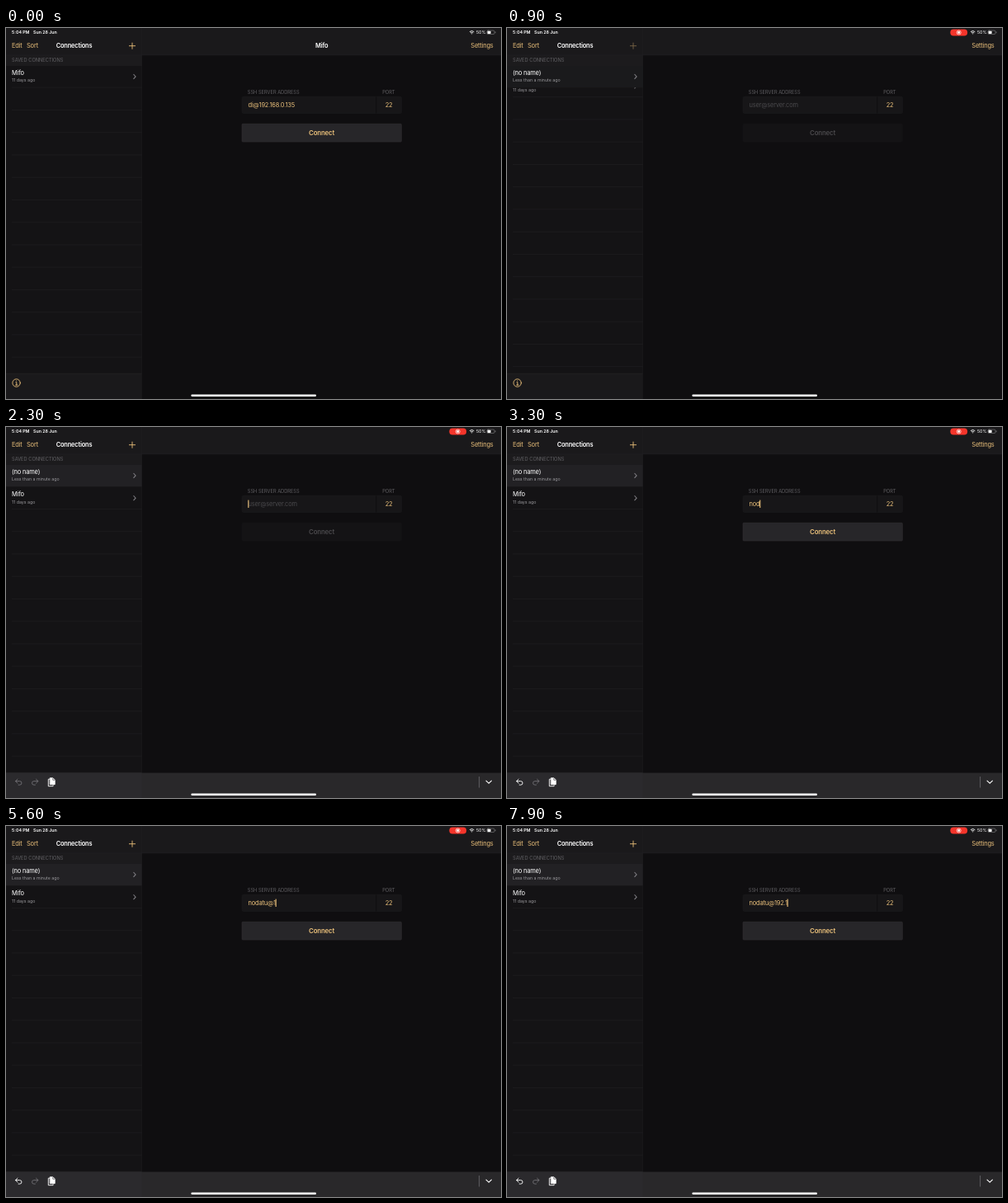
These frames come from a looping animation (600 by 450 pixels, 8 s). An HTML page:

```html
<!DOCTYPE html>
<html lang="en">
<head>
<meta charset="utf-8">
<title>Connections</title>
<style>
  html, body { margin: 0; width: 100%; height: 100%; overflow: hidden; background: #0f0e10; }
  svg { display: block; width: 600px; height: 450px; }
  text { font: 7.47px Inter, sans-serif; letter-spacing: -.025em; fill: #fff; white-space: pre; }
  .small { font-size: 5.27px; letter-spacing: 0; }
  .sub { fill: #98979b; }
  .label { font-size: 5.7px; letter-spacing: 0; fill: #626165; }
  .bold { font-weight: 600; }
  .gold { fill: #e9bf7a; }
  .mid { text-anchor: middle; }
  .hint { fill: #4a494c; }
  .line { fill: none; stroke: #fff; stroke-linecap: round; stroke-linejoin: round; }
  .chevron { fill: none; stroke: #7d7c80; stroke-width: 1.1; }
  #button { font-size: 7.9px; }
</style>
</head>
<body>
<svg viewBox="0 0 600 450">
  <rect width="600" height="450" fill="#0f0e10"/>
  <rect width="164.5" height="450" fill="#141315"/>

  <g id="list">
    <path id="rules" stroke="#201f22" stroke-width=".7"/>
    <text x="7" y="57">Mifo</text>
    <text x="7" y="65.3" class="small sub">11 days ago</text>
    <path d="M154.5 56l2.6 2.9-2.6 2.9" class="chevron"/>
  </g>
  <g id="newRow">
    <rect y="46" width="164.5" height="26.3" fill="#151416"/>
    <rect id="selected" y="46" width="164.5" height="26.3" fill="#222124"/>
    <text x="7" y="57">(no name)</text>
    <text x="7" y="65.3" class="small sub">Less than a minute ago</text>
    <path d="M154.5 56l2.6 2.9-2.6 2.9" class="chevron"/>
  </g>

  <rect width="600" height="33" fill="#1a191b"/>
  <rect y="33" width="164.5" height="13" fill="#1c1b1d"/>
  <path d="M0 32.8H600M164.6 0V450" stroke="#232225" stroke-width=".5"/>
  <text x="7" y="7.3" class="small bold">5:04 PM</text>
  <text x="33" y="7.3" class="small bold">Sun 28 Jun</text>
  <text x="570" y="7.3" class="small">50%</text>
  <g class="line" stroke-width=".9">
    <path d="M562.2 4.4q2.4-2.2 4.8 0M563.3 5.7q1.3-1.1 2.6 0M564.6 6.9v.1"/>
    <rect x="583" y="3.1" width="9" height="4.4" rx="1.2" stroke-width=".5" opacity=".55"/>
    <path d="M593.1 4.8v1" stroke-width=".6" opacity=".55"/>
  </g>
  <rect x="583.6" y="3.7" width="4" height="3.2" rx=".7" fill="#fff"/>
  <g id="recording">
    <rect x="537.3" y="1.6" width="20.8" height="7.8" rx="3.9" fill="#f5352b"/>
    <circle cx="547.7" cy="5.5" r="2.5" fill="none" stroke="#fff" stroke-width=".7"/>
    <circle cx="547.7" cy="5.5" r="1.4" fill="#fff"/>
  </g>

  <text x="7" y="24.4" class="gold">Edit</text>
  <text x="25" y="24.4" class="gold">Sort</text>
  <text x="82.5" y="24.4" class="bold mid">Connections</text>
  <path id="plus" d="M149 21.7h8M153 17.7v8" stroke="#e9bf7a" stroke-width=".9"/>
  <text id="title" x="382.8" y="24.4" class="bold mid">Mifo</text>
  <text x="563.3" y="24.4" class="gold">Settings</text>
  <text x="7" y="41.3" class="label">SAVED CONNECTIONS</text>

  <text x="292.8" y="80.1" class="label">SSH SERVER ADDRESS</text>
  <text x="456.2" y="80.1" class="label">PORT</text>
  <rect x="286" y="83.3" width="193.6" height="20.2" rx="1.8" fill="#171618" stroke="#1d1c1f" stroke-width=".5"/>
  <path d="M448.7 83.3v20.2" stroke="#0f0e10" stroke-width=".8"/>
  <text id="hint" x="293.5" y="96.1" class="hint">user@server.com</text>
  <text id="address" x="293.5" y="96.1" class="gold"></text>
  <rect id="caret" y="88.6" width="1.1" height="9.4" fill="#f0c47c"/>
  <text x="464" y="96.1" class="gold mid">22</text>
  <rect id="buttonBox" x="286" y="116.3" width="193.4" height="21.8" rx="1" stroke-width=".5"/>
  <text id="button" x="382.6" y="130.1" class="bold mid">Connect</text>

  <rect y="419.3" width="164.4" height="31" fill="#1a191b"/>
  <path d="M0 419.3H164.4" stroke="#29282b" stroke-width=".5"/>
  <g class="line" stroke-width=".9" style="stroke:#e9bf7a">
    <circle cx="12.6" cy="430.5" r="4.7"/>
    <path d="M12 429.7h.8v3.3M11.7 433h2.2M12.6 427.9v.1"/>
  </g>

  <g id="bar">
    <rect y="419.5" width="600" height="31" fill="#29282a"/>
    <rect y="419.5" width="164.5" height="31" fill="#2b2a2d"/>
    <g class="line" stroke-width=".9">
      <path id="undo" d="M14 427.2l-2.5 2.4 2.5 2.4M11.6 429.6h5.1a2.2 2.2 0 0 1 0 4.5h-1.6"/>
      <path d="M36.5 427.2l2.5 2.4-2.5 2.4M38.9 429.6h-5.1a2.2 2.2 0 0 0 0 4.5h1.6" style="stroke:#737276"/>
      <path d="M53.3 427.2h-2v8.5h5.8v-1"/>
      <path d="M53.6 425.8h3.4l2.2 2.2v5.6h-5.6z" fill="#fff"/>
      <path d="M582 429.2l3.2 3 3.2-3" stroke-width="1.1"/>
    </g>
    <path d="M56.8 425.6v2.6h2.6" fill="none" stroke="#29282a" stroke-width=".6"/>
    <path d="M573.6 424v13.5" stroke="#77767a" stroke-width=".7"/>
  </g>
  <rect x="224.4" y="444.4" width="151.6" height="2.5" rx="1.25" fill="#fff"/>
</svg>
<script>
const DURATION = 8000, ROW = 27.25, INSERT = 750, FOCUS = 1150;
const TYPED = 'nodatu@192.1';
const KEYS = [2750, 2950, 3150, 3450, 3650, 3850, 4450, 5450, 5850, 6150, 6450, 7550];

const $ = id => document.getElementById(id);
const ramp = (t, from, to) => Math.min(1, Math.max(0, (t - from) / (to - from)));
const smooth = (t, from, to) => { const p = ramp(t, from, to); return p * p * (3 - 2 * p); };
const show = (id, opacity) => $(id).setAttribute('opacity', Number(opacity));

$('rules').setAttribute('d',
  Array.from({ length: 13 }, (_, i) => `M7 ${72.2 + i * ROW}H164.5`).join(''));

function render(t) {
  const isNew = t >= INSERT;
  const count = KEYS.filter(key => t >= key).length;
  const text = isNew ? TYPED.slice(0, count) : 'di@192.168.0.135';
  const enabled = text !== '' && !text.endsWith('@');

  show('recording', t >= 250);
  show('title', !isNew);
  show('newRow', isNew);
  show('selected', smooth(t, 820, 1000));
  show('plus', 1 - .7 * (ramp(t, 580, 640) - ramp(t, 850, 1080)));
  $('list').setAttribute('transform', `translate(0 ${ROW * smooth(t, INSERT - 10, 1100)})`);

  $('address').textContent = text;
  show('hint', text === '');
  $('buttonBox').setAttribute('fill', enabled ? '#272629' : '#141315');
  $('buttonBox').setAttribute('stroke', enabled ? '#343336' : '#171618');
  $('button').style.fill = enabled ? '#e9bf7a' : '#4a494c';

  const phase = (t - (count ? KEYS[count - 1] : FOCUS)) % 1000;
  const blink = 1 - ramp(phase, 500, 650) + ramp(phase, 880, 1000);
  $('caret').setAttribute('x', 293.3 + (text ? $('address').getComputedTextLength() : 0));
  show('caret', t >= FOCUS ? blink : 0);

  $('bar').setAttribute('transform', `translate(0 ${31 * (1 - smooth(t, 1020, 1270))})`);
  $('undo').style.stroke = count ? '#fff' : '#737276';
}

function tick() {
  render(performance.now() % DURATION);
  requestAnimationFrame(tick);
}
tick();
</script>
</body>
</html>
```
